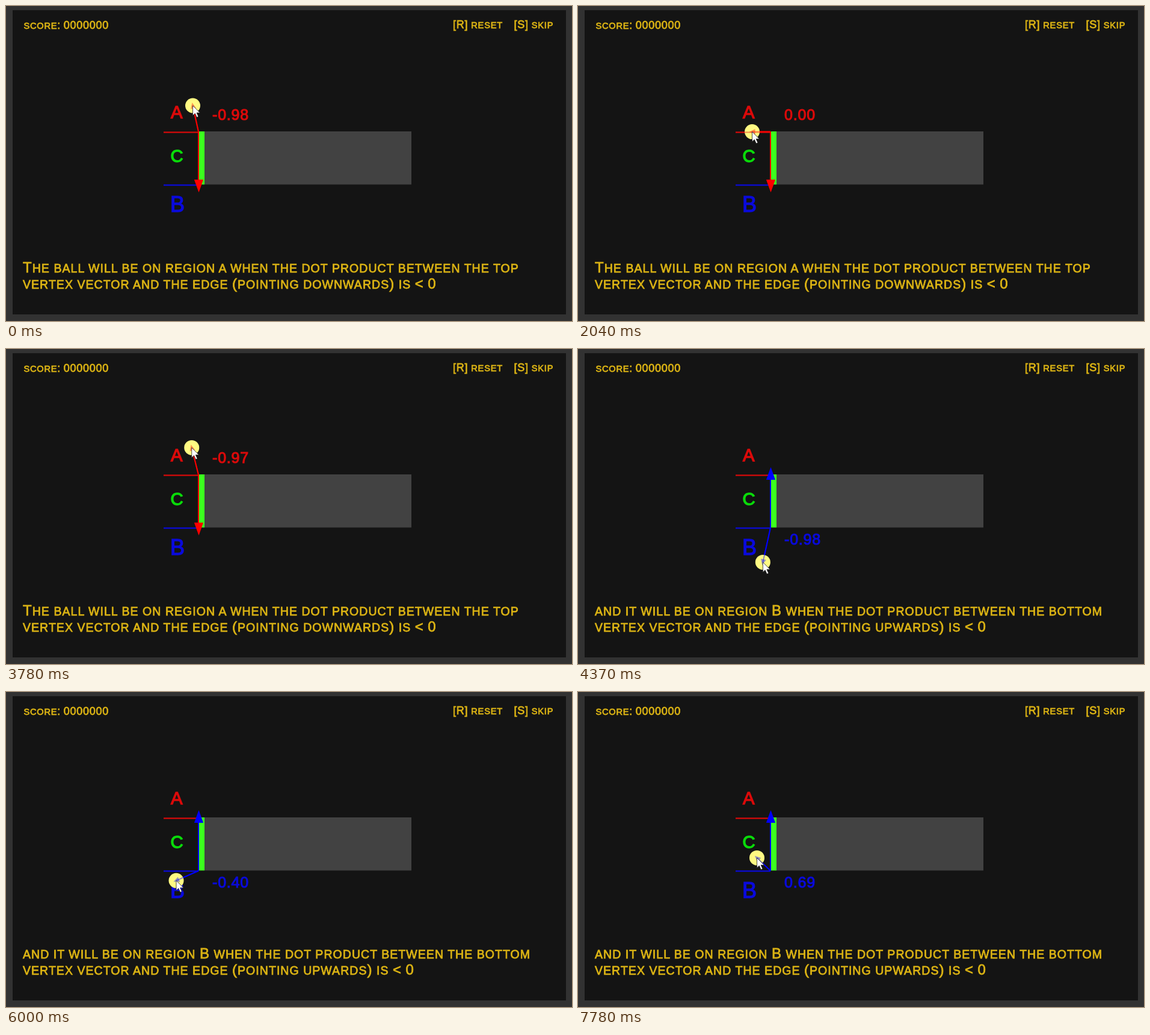
Animation of 941x525 px, one loop 8 s. Source, as an HTML page:

```html
<!DOCTYPE html>
<html lang="en">
<head>
<meta charset="utf-8">
<title>Dot product regions</title>
<style>
  html, body { margin: 0; width: 100%; height: 100%; overflow: hidden; background: #323232; }
  svg { display: block; width: 941px; height: 525px; }
  text { font-family: "Liberation Sans", Arial, sans-serif; white-space: pre; }
  .hud { fill: #dcb414; stroke: #dcb414; stroke-width: .8; }
  .region { stroke-width: 1.4; }
  .value { font-size: 25px; letter-spacing: .8px; stroke-width: 1.1; }
  .red { fill: #dc0a0a; stroke: #dc0a0a; }
  .green { fill: #0adc0a; stroke: #0adc0a; }
  .blue { fill: #0a0adc; stroke: #0a0adc; }
  #lines line { stroke-width: 2; }
</style>
</head>
<body>
<svg viewBox="0 0 941 525">
  <rect x="11" y="7" width="920" height="507" fill="#141414"/>
  <rect x="330" y="209" width="344" height="88.5" fill="#424242"/>
  <rect x="321" y="209" width="9" height="88.5" fill="#3cff1e"/>

  <text class="hud" x="29.5" y="38" data-size="18" data-gap=".75">score: 0000000</text>
  <text class="hud" x="743" y="37" data-size="18" data-gap=".8">[R] reset</text>
  <text class="hud" x="844.5" y="37" data-size="18" data-gap=".8">[S] skip</text>
  <text class="hud" id="caption1" x="28" y="444" data-size="24" data-gap="1.05"></text>
  <text class="hud" id="caption2" x="28" y="471" data-size="24" data-gap="1.05"></text>

  <text class="region red" x="274" y="187" data-size="36">a</text>
  <text class="region green" x="273.5" y="260" data-size="36">c</text>
  <text class="region blue" x="273" y="343" data-size="36">B</text>

  <g id="lines">
    <line class="red" x1="262" y1="210.5" x2="320" y2="210.5"/>
    <line class="blue" x1="262" y1="298.5" x2="320" y2="298.5"/>
    <g id="vector">
      <line id="edge" x1="320" x2="320"/>
      <path id="edgeHead" stroke="none"/>
      <line id="toBall"/>
    </g>
  </g>
  <text id="value" x="343"></text>

  <g id="ball">
    <circle r="12.5" fill="#fffa82"/>
    <path id="ballHead" d="M5 0L-5-4.5V4.5Z" opacity=".4"/>
  </g>
  <use href="#lines" opacity=".45"/>
  <path id="cursor" d="M0 0V16.5L3.8 13L6.7 19.5L9.4 18.3L6.6 12H12Z"
        fill="#fff" stroke="#222" stroke-width=".8"/>
</svg>
<script>
const DURATION = 8000;
const STEP = 74;
const EDGE_X = 320;
const $ = id => document.getElementById(id);

// Each phase follows the pointer through a few key points; dir is the edge's direction in y.
const phases = [
  { name: "red", color: "#f00", vertex: 209.5, far: 298, dir: 1, valueY: 190,
    caption: ["The ball will be on region a when the dot product between the top",
              "vertex vector and the edge (pointing downwards) is < 0"],
    path: [
      { t: 0, x: 310.5, y: 166 },
      { t: 1080, x: 290, y: 195.5 },
      { t: 2040, x: 289.5, y: 210.3 },
      { t: 2700, x: 287, y: 221 },
      { t: 3180, x: 289.5, y: 198 },
      { t: 3780, x: 309, y: 164 }
    ] },
  { name: "blue", color: "#00f", vertex: 298, far: 209.5, dir: -1, valueY: 326,
    caption: ["and it will be on region B when the dot product between the bottom",
              "vertex vector and the edge (pointing upwards) is < 0"],
    path: [
      { t: 3840, x: 321, y: 358 },
      { t: 4360, x: 307.5, y: 355.5 },
      { t: 5040, x: 280, y: 341 },
      { t: 5250, x: 277.5, y: 331.7 },
      { t: 6730, x: 288.5, y: 297 },
      { t: 7765, x: 297.5, y: 276.4 }
    ] }
];

function setAttrs(el, attrs) {
  for (const [key, val] of Object.entries(attrs)) el.setAttribute(key, val);
}

// Small capitals: lower case becomes capitals at a reduced size.
function smallCaps(el, text) {
  const { size, gap = 0 } = el.dataset;
  el.textContent = "";
  el.style.letterSpacing = gap + "px";
  for (const part of text.match(/[a-z ]+|[^a-z ]+/g)) {
    const span = document.createElementNS(el.namespaceURI, "tspan");
    span.style.fontSize = size * (/[a-z ]/.test(part) ? .8125 : 1) + "px";
    span.textContent = part.toUpperCase();
    el.append(span);
  }
}

function positionAt(path, t) {
  const next = path.findIndex(key => key.t > t);
  if (next < 0) return path.at(-1);
  const a = path[next - 1], b = path[next];
  const p = (t - a.t) / (b.t - a.t);
  return { x: a.x + (b.x - a.x) * p, y: a.y + (b.y - a.y) * p };
}

let current;
function showPhase(phase) {
  if (phase === current) return;
  current = phase;
  const { name, color, vertex, far, dir, valueY, caption } = phase;
  const tip = far + 12.5 * dir, base = tip - 21 * dir;
  setAttrs($("vector"), { fill: color, stroke: color });
  setAttrs($("edge"), { y1: vertex, y2: base });
  setAttrs($("edgeHead"), { d: `M${EDGE_X - 7} ${base}h15L${EDGE_X + .5} ${tip}Z` });
  setAttrs($("ballHead"), { fill: color });
  setAttrs($("value"), { class: "value " + name, y: valueY });
  caption.forEach((line, i) => smallCaps($("caption" + (i + 1)), line));
}

function draw(time) {
  // The pointer is sampled in even steps.
  const t = Math.max(0, Math.floor((time + 2) / STEP) * STEP - 2);
  const phase = phases.findLast(({ path }) => path[0].t <= t);
  const { x, y } = positionAt(phase.path, t);
  const dx = x - EDGE_X, dy = y - phase.vertex;
  const place = `translate(${x} ${y})`;
  showPhase(phase);
  setAttrs($("toBall"), { x1: EDGE_X, y1: phase.vertex, x2: x, y2: y });
  setAttrs($("ball"), { transform: place });
  setAttrs($("ballHead"), { transform: `rotate(${Math.atan2(dy, dx) * 180 / Math.PI})` });
  setAttrs($("cursor"), { transform: place });
  $("value").textContent = (phase.dir * dy / Math.hypot(dx, dy)).toFixed(2);
}

document.querySelectorAll("[data-size]").forEach(el => {
  if (el.textContent) smallCaps(el, el.textContent);
});

const start = performance.now();
function frame() {
  draw((performance.now() - start) % DURATION);
  requestAnimationFrame(frame);
}
frame();
</script>
</body>
</html>
```
